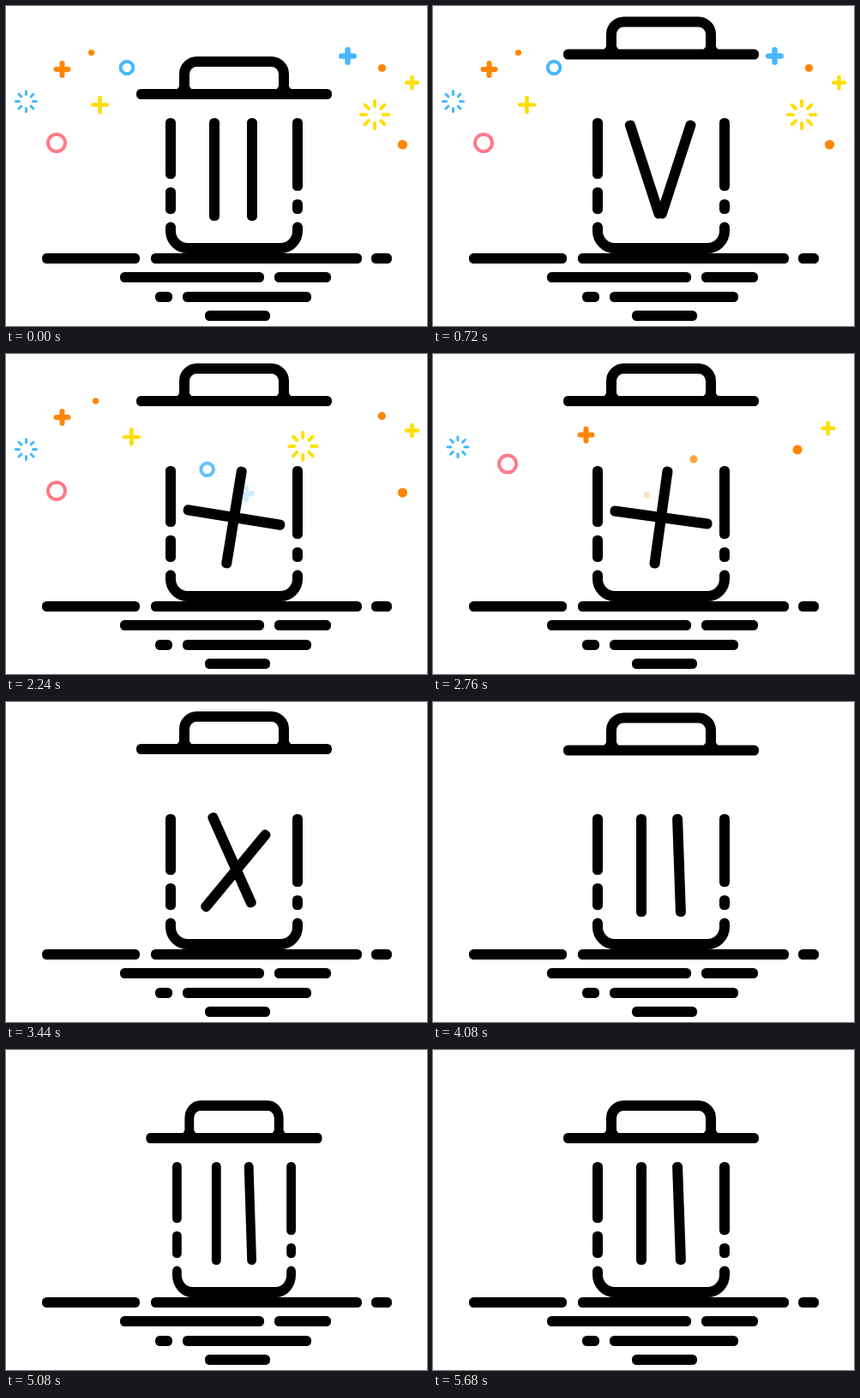
An HTML page that plays this animation: 491x374 px, repeating every 5840 ms.

```html
<!DOCTYPE html>
<html lang="en">
<head>
<meta charset="utf-8">
<title>Bin</title>
<style>
  html, body { margin: 0; width: 100%; height: 100%; overflow: hidden; background: #fff; }
  svg { display: block; width: 491px; height: 374px; }
</style>
</head>
<body>
<svg id="stage" viewBox="0 0 491 374" xmlns="http://www.w3.org/2000/svg"></svg>
<script>
const LOOP = 5840, STEP = 40, MID = 266;
const BLUE = '#47b8ff', ORANGE = '#ff8600', YELLOW = '#ffde00', PINK = '#ff7a86';
const stage = document.getElementById('stage');

function el(parent, tag, attrs = {}) {
  const node = document.createElementNS('http://www.w3.org/2000/svg', tag);
  for (const key in attrs) node.setAttribute(key, attrs[key]);
  return parent.appendChild(node);
}
const group = (parent) => el(parent, 'g');
const pill = (parent, x, y, width, height) => el(parent, 'rect', { x, y, width, height, rx: 5.3 });
const place = (node, value) => node.setAttribute('transform', value);

// Particle shapes, each drawn around its own centre
const strokes = (parent, d, color, width) =>
  el(parent, 'path', { d, stroke: color, 'stroke-width': width, 'stroke-linecap': 'round', fill: 'none' });
const plus = (color, size, width) => (g) => {
  const r = size - width / 2;
  strokes(g, `M${-r} 0H${r}M0 ${-r}V${r}`, color, width);
};
const dot = (color, r) => (g) => el(g, 'circle', { r, fill: color });
const ring = (color, r, width) => (g) =>
  el(g, 'circle', { r, fill: 'none', stroke: color, 'stroke-width': width });
const burst = (color, inner, outer, width) => (g) => {
  let d = '';
  for (let i = 0; i < 8; i++) {
    const c = Math.cos(i * Math.PI / 4), s = Math.sin(i * Math.PI / 4);
    d += `M${c * inner} ${s * inner}L${c * outer} ${s * outer}`;
  }
  strokes(g, d, color, width);
};

// shape, start x, y, arc control x, y, start time
const particles = [
  [plus(BLUE, 10.5, 6.5), 398.5, 58.5, 330, 50, 1620],
  [ring(BLUE, 7.3, 4), 141, 72, 200, 60, 1720],
  [burst(YELLOW, 10, 16, 4), 430, 127, 360, 50, 1820],
  [plus(YELLOW, 10.7, 4.6), 109.5, 115.5, 170, 55, 1940],
  [dot(ORANGE, 3.6), 99.5, 54.5, 180, 60, 2140],
  [dot(ORANGE, 4.6), 438.5, 72.5, 350, 12, 2226],
  [plus(ORANGE, 10, 6), 65.5, 74, 150, 30, 2318],
  [dot(ORANGE, 5.6), 462.5, 162, 370, 2, 2507],
  [ring(PINK, 10, 4), 59, 160, 150, 35, 2540],
  [plus(YELLOW, 8.7, 4.4), 473.5, 89.5, 266, 45, 2660],
  [burst(BLUE, 8, 12, 3), 23.5, 111.5, 160, 40, 2680]
].map(([draw, x, y, cx, cy, start]) => {
  const node = group(stage);
  draw(node);
  return { node, x, y, cx, cy, start };
});

// Ground: y, then x and width pairs
[[289, 42, 114, 169, 246, 426, 24],
 [311, 133, 168, 313, 66],
 [334, 174, 20, 206, 150],
 [356, 232, 76]].forEach(([y, ...runs]) => {
  for (let i = 0; i < runs.length; i += 2) pill(stage, runs[i], y, runs[i + 1], 12);
});

// Bin
const bin = group(stage);
[[186, 131, 71], [186, 212, 31], [334, 131, 85], [334, 226, 17]]
  .forEach(([x, y, h]) => pill(bin, x, y, 12, h));
strokes(bin, 'M192 258.5V263A20 20 0 0 0 212 283H320A20 20 0 0 0 340 263V258.5', '#000', 12);

const lid = group(bin);
pill(lid, 152, 97, 228, 12);
strokes(lid, 'M208 101V79.5A14.5 14.5 0 0 1 222.5 65H309.5A14.5 14.5 0 0 1 324 79.5V101', '#000', 12);
el(lid, 'path', { d: 'M199 98L202 94H214L217 98ZM315 98L318 94H330L333 98Z' });

const bars = [-1, 1].map((side) => {
  const node = group(bin);
  pill(node, -6, -60, 12, 120);
  return { node, side };
});

// Timing
const part = (t, from, to) => Math.min(1, Math.max(0, (t - from) / (to - from)));
const inOut = (p, power) =>
  p < 0.5 ? Math.pow(2 * p, power) / 2 : 1 - Math.pow(2 - 2 * p, power) / 2;

function drawBars(t) {
  const cross = part(t, 400, 1200), back = part(t, 3200, 4000);
  const spin = 1080 * inOut(part(t, 1600, 4000), 2.1);
  const apart = back > 0 ? back : 1 - cross * cross;
  const turn = spin * Math.PI / 180;
  for (const { node, side } of bars) {
    // The right bar carries on round and stops slightly short of upright
    const own = 45 * cross * side + back * (side > 0 ? 133 : 45);
    const x = MID - apart + side * 22 * apart * Math.cos(turn);
    const y = 191 + side * 22 * apart * Math.sin(turn);
    place(node, `translate(${x} ${y}) rotate(${own + spin})`);
  }
}

function drawParticles(t) {
  for (const { node, x, y, cx, cy, start } of particles) {
    const s = inOut(part(t, start, start + 800), 2), r = 1 - s;
    const px = r * r * x + 2 * r * s * cx + s * s * 267;
    const py = r * r * y + 2 * r * s * cy + s * s * 190;
    place(node, `translate(${px} ${py})`);
    node.setAttribute('opacity', 1 - part(s, 0.72, 0.96));
  }
}

function render(t) {
  const lift = inOut(part(t, 400, 800), 3) - inOut(part(t, 4000, 4400), 3);
  const squeeze = inOut(part(t, 4800, 5240), 3) - inOut(part(t, 5240, 5680), 3);
  place(lid, `translate(0 ${-48 * lift})`);
  place(bin, `translate(${MID} 0) scale(${1 - 0.124 * squeeze} 1) translate(${-MID} 0)`);
  drawBars(t);
  drawParticles(t);
}

const begin = performance.now();
function tick() {
  const t = (performance.now() - begin) % LOOP;
  render(Math.floor(t / STEP) * STEP);
  requestAnimationFrame(tick);
}
tick();
</script>
</body>
</html>
```
